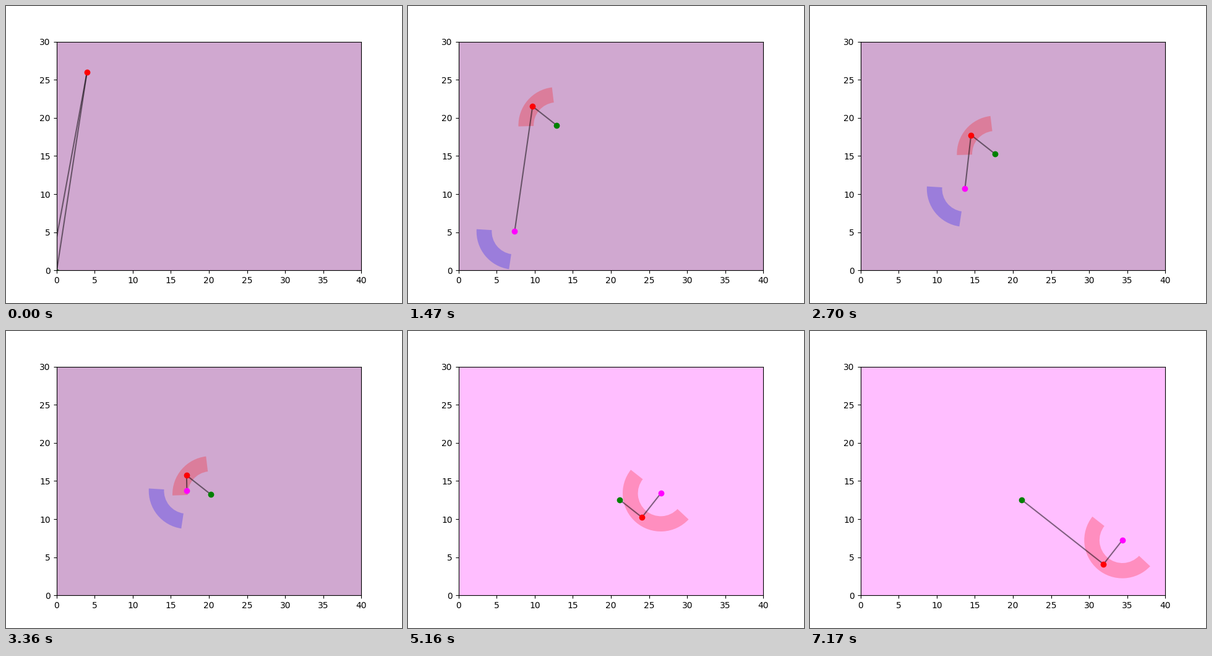
Animation, 640 px wide and 480 px high, one loop 7200 ms. Source, as a matplotlib script:

```python
import numpy as np
import matplotlib.pyplot as plt
from matplotlib.animation import FuncAnimation
from matplotlib.patches import Wedge

FRAMES, INTERVAL = 240, 30
SWITCH = FRAMES // 2      # second half of the manoeuvre starts
LEAD_LOCK, WING_LOCK = 36, 150
GAP = 4                   # distance kept from the red runner

START, END = np.array([4, 26]), np.array([32, 4])
AHEAD = (END - START) / np.hypot(*(END - START))
SIDE = np.array([-AHEAD[1], AHEAD[0]])
BACK = np.degrees(np.arctan2(-AHEAD[1], -AHEAD[0]))

WING_START = np.array([-0.21, -1.61])
WING_STEP = np.array([0.1546, 0.1368])
WING_BACK = 180 + np.degrees(np.arctan2(WING_STEP[1], WING_STEP[0]))


def runner(i):
    return START + (END - START) * i / FRAMES


def beside(i, along, across):
    return runner(i) + along * AHEAD + across * SIDE


def leader(i):
    i = min(i, SWITCH)
    u = min(i / LEAD_LOCK, 1)
    rest = (1 - u) ** 2.476
    return beside(i, GAP + 9.05 * rest - 11.09 * u * (1 - u), -23.07 * rest)


def wingman(i):
    if i < SWITCH:
        drift = np.array([-0.8, 0.3]) * np.exp(-i / 8)
        return WING_START + WING_STEP * i + drift
    u = min((i - SWITCH) / (WING_LOCK - SWITCH), 1)
    rest = (1 - u) ** 1.83
    return beside(i, 0.39 * rest - 2 * u * (1 - u), GAP - 3.94 * rest)


fig, ax = plt.subplots(figsize=(6.4, 4.8), dpi=100)
ax.set_aspect("equal")
ax.set_xlim(0, 40)
ax.set_ylim(0, 30)


def sector(color):
    patch = Wedge((0, 0), 5, 0, 90, width=2, fc=color, ec="none", alpha=0.25)
    return ax.add_patch(patch)


def link():
    return ax.plot([], [], color="black", alpha=0.5, lw=1.5, zorder=2)[0]


def dot(color):
    return ax.plot([], [], "o", color=color, zorder=2.1)[0]


def place(patch, center, start, stop, visible):
    patch.set_center(center)
    patch.set_theta1(start)
    patch.set_theta2(stop)
    patch.set_visible(visible)


lead_zone, wing_zone = sector("red"), sector("blue")
lead_link, wing_link = link(), link()
lead_dot, wing_dot, run_dot = dot("green"), dot("magenta"), dot("red")


def update(i):
    run, lead, wing = runner(i), leader(i), wingman(i)
    first = i < SWITCH
    ax.set_facecolor("#d0a8d0" if first else "#ffbeff")

    for mark, pos in ((run_dot, run), (lead_dot, lead), (wing_dot, wing)):
        mark.set_data([pos[0]], [pos[1]])
    for line, pos in ((lead_link, lead), (wing_link, wing)):
        line.set_data([run[0], pos[0]], [run[1], pos[1]])

    locked = first and i >= LEAD_LOCK
    place(lead_zone, lead, BACK - 45, BACK + 40, locked)
    if first:
        wing_zone.set_facecolor("blue")
        place(wing_zone, wing, WING_BACK - 45, WING_BACK + 40, locked)
    else:
        wing_zone.set_facecolor("red")
        place(wing_zone, wing, BACK, BACK + 175, i >= WING_LOCK)
    return []


anim = FuncAnimation(fig, update, frames=FRAMES, interval=INTERVAL,
                     init_func=lambda: update(0), repeat=True, repeat_delay=0)
plt.show()
```
